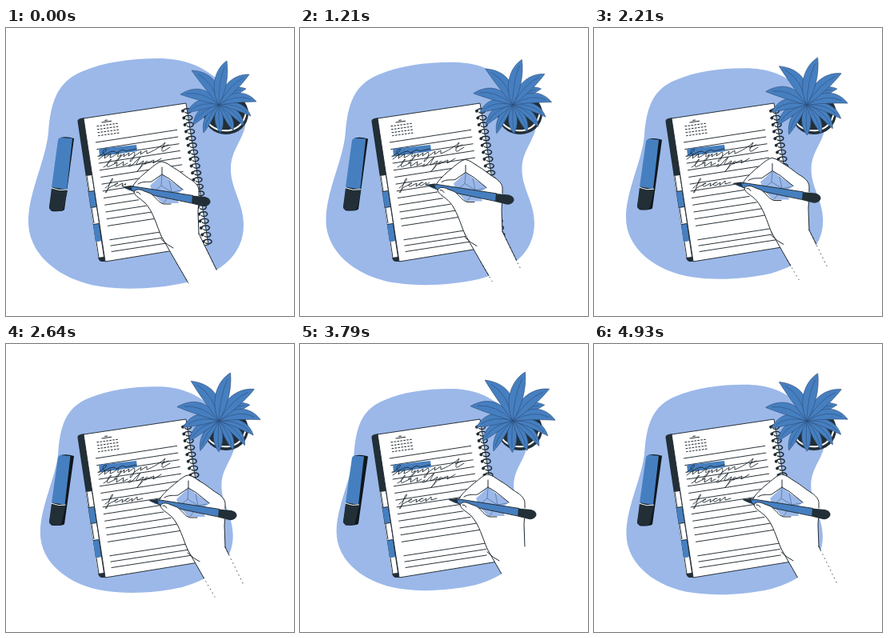
Write an HTML page that moves like this. It is 360x360 px and loops after 5 s.

```html
<!DOCTYPE html>
<html lang="en">
<head>
<meta charset="utf-8">
<title>Writing in a notebook</title>
<style>
html, body { margin: 0; width: 100%; height: 100%; overflow: hidden; background: #fff; }
svg { display: block; width: 100%; height: 100%; }
.ink { fill: none; stroke: #202a30; stroke-width: 1; stroke-linecap: round; stroke-linejoin: round; }
.thin { fill: none; stroke: #202a30; stroke-width: .95; }
.script { stroke-width: .9; }
.ring { stroke-width: 1.4; }
.dash { stroke-dasharray: 2.6 1.4; stroke-linecap: butt; }
.dots { stroke-dasharray: .5 5; }
.dark { fill: #222f37; }
.blue { fill: #467fc0; }
.pale { fill: #9bb8e9; }
.white { fill: #fff; }
.leaf { fill: #467fc0; stroke: #2b4a75; stroke-width: .55; }
.vein { fill: none; stroke: #2b4a75; stroke-width: .5; }
</style>
</head>
<body>
<svg viewBox="0 0 360 360">
  <defs>
    <path id="blobShape" d="M190 38C222 38 243 47 262 62C285 78 302 100 299 122C296 140 282 152 281 174C280 200 297 218 297 246C297 284 268 306 226 318C190 326 150 328 118 323C70 316 28 285 28 242C28 205 50 165 53 130C56 92 64 67 96 54C122 43 155 38 190 38Z"/>
    <clipPath id="blobClip"><use id="blobMask" href="#blobShape"/></clipPath>
    <clipPath id="wordClip"><rect id="wordRect" x="110" y="180" height="35"/></clipPath>
  </defs>

  <use id="blob" class="pale" href="#blobShape"/>

  <g id="marker">
    <path fill="#10171c" d="M68 137Q76 135 85 138L73 227Q71 230 57 229L54 225Z"/>
    <path id="markerFace" class="blue"/>
    <path id="markerCap" class="dark"/>
    <path id="markerLine" fill="none" stroke="#fff"/>
  </g>

  <g id="book">
    <path class="dark" d="M89.5 117Q89 114 93 113L98 112L124 292L119 292Q116 291 115 287Z"/>
    <path class="white" d="M97 113L225 94L253 271L124 292Z"/>
    <path class="white" d="M100 185L107 184L110 203L103 204ZM106 225L113 224L116 244L109 245ZM112 267L119 266L122 286L115 287Z"/>
    <path class="blue" d="M103 205L110 204L113 223L106 224ZM109 246L116 245L119 266L112 267Z"/>
    <path class="thin" d="M97 113L225 94L253 271L124 292ZM101 185L104 204M107 225L110 244M113 267L116 287"/>
    <path id="rules" class="thin"/>
    <g class="ink" transform="rotate(-8 127 126)">
      <path d="M121 117H133M125 115H128"/>
      <path class="dash" d="M114 121H141M114 125H141M114 129H141M114 133H141"/>
    </g>
    <path class="blue" d="M116 151L163 146L164 154L117 160Z"/>
    <g class="ink">
      <path class="script" d="M116 160C122 157 127 152 125 151C121 151 119 158 124 158L130 155L135 154L138 156L146 152L150 154L163 151"/>
      <path class="script" d="M116 164L124 158L123 163L131 157L130 162C136 160 138 157 141 156C138 162 140 162 144 158C145 158 139 168 136 169C134 168 142 162 148 157L147 161L154 156L153 160L160 155C163 156 158 167 155 167C155 163 164 158 169 154L168 158L176 153L176 157C184 154 194 148 199 143C195 151 193 155 197 154L205 149M194 150L203 146"/>
      <path class="script" d="M122 174C128 171 133 163 131 164C127 167 124 176 129 173L139 168L138 173L147 167L146 172L152 169M156 170C152 171 152 175 157 172L168 161C163 169 161 173 166 170L172 166C170 171 166 178 164 179L175 167C179 165 177 170 173 170L185 165L184 169L194 163"/>
      <path class="script" clip-path="url(#wordClip)" d="M124 200C130 196 135 188 133 188C130 190 128 202 125 206C123 206 128 199 134 197L140 194C136 194 134 198 138 198L146 194L145 198L152 193M154 193C149 193 148 198 152 197L158 193L157 197L164 191L164 195L171 193"/>
    </g>
    <g id="rings"></g>
  </g>

  <g id="pot">
    <ellipse class="dark" cx="275" cy="107" rx="28" ry="26"/>
    <path fill="none" stroke="#fff" stroke-width="2" d="M251 116Q260 130 279 128Q296 125 300 106"/>
  </g>
  <g id="plant"></g>

  <g id="hand">
    <path class="white" d="M159 202C160 193 166 188 174 181C184 173 190 167 195 167C201 168 205 172 210 175C219 180 226 187 232 190C239 195 241 199 241 203L240 230L241 257L264 304L228 319L214 295L194 260C188 246 184 230 175 220C170 214 161 211 160 205Z"/>
    <path class="pale" d="M180 197L195 183L204 190L222 202L212 208L216 219L195 219L184 207Z"/>
    <path class="vein" d="M195 184L194 197L182 207M194 197L207 205L197 219M204 190L207 205L219 203"/>
  </g>
  <g id="pen">
    <path class="blue" d="M146 199L156 197.5L234 209.5L233 219L154 203Z"/>
    <path class="dark" d="M145 198.5L156 197L158 203.8Z"/>
    <path class="dark" d="M233 209.5L249 211Q256 213 255.5 218Q253 224 246 223L232 219.5Z"/>
    <path class="thin" d="M156 197.5L234 209.5M157 203.5L232 219"/>
    <path class="white" d="M160 205C162 201 167 201 173 204L181 207C188 212 190 218 195 223L185 232C176 220 161 213 160 207Z"/>
    <path class="ink" d="M158 199C160 194 166 188 174 181C184 173 190 167 195 167C201 168 205 172 210 175C219 180 226 187 232 190C239 195 241 199 241 203V209"/>
    <path class="ink" d="M165 195C171 191 178 193 182 192L195 183V174M195 183L205 189L221 202"/>
    <path class="ink" d="M160 205C162 201 167 201 173 204L181 207C188 212 190 218 197 220L206 220M163 205Q166 204 168 208M160 205C161 211 170 214 175 220C184 230 188 246 194 260"/>
    <path class="ink" d="M240.5 222L240 230L241 257M194 264Q201 271 209 275"/>
  </g>
  <g clip-path="url(#blobClip)">
    <path id="arm" class="ink" d="M194 260L214 295L228 319M241 257L264 304"/>
  </g>
  <g id="dots" class="ink dots">
    <path id="dotsLeft" d="M214 295L228 319"/>
    <path id="dotsRight" d="M241 257L264 304"/>
  </g>
</svg>
<script>
const NS = "http://www.w3.org/2000/svg";
const LOOP = 5000;
const $ = id => document.getElementById(id);

function add(parent, tag, attrs) {
  const el = document.createElementNS(NS, tag);
  for (const k in attrs) el.setAttribute(k, attrs[k]);
  return $(parent).appendChild(el);
}

// Ruled lines and spiral binding
const rows = [...Array(13).keys(), 14, 14.85, 15.7];
$("rules").setAttribute("d", rows.map(k =>
  `M${112 + 1.25 * k} ${143 + 8.7 * k}l102 -15.7`).join(""));

for (let i = 0; i < 20; i++) {
  const y = 103 + 8.6 * i, x = 226 + (y - 103) * .157;
  add("rings", "circle", { cx: x - 5, cy: y + .8, r: 2, class: "dark" });
  add("rings", "path", { class: "ink ring",
    d: `M${x - 5} ${y}C${x - 2} ${y - 3} ${x + 5} ${y - 3} ${x + 5.5} ${y + .5}C${x + 5} ${y + 4} ${x} ${y + 4} ${x - 2} ${y + 2.5}` });
}

// Leaves: tip x, tip y, half width, bend
const core = [266, 96];
const leaves = [
  [268, 131, 7, 1], [284, 128, 6, -3], [247, 131, 6, 4], [297, 122, 6, -6],
  [234, 121, 7, 6], [306, 110, 6, -7], [226, 106, 8, 7], [300, 76, 7, -6],
  [313, 92, 8, -9], [218, 83, 9, 8], [304, 58, 9, -6], [232, 53, 10, 9],
  [276, 41, 10, -4]
];
for (const [tx, ty, w, bend] of leaves) {
  const [cx, cy] = core, dx = tx - cx, dy = ty - cy, len = Math.hypot(dx, dy);
  const at = (u, v) =>
    `${(cx + dx * u - dy / len * v).toFixed(1)} ${(cy + dy * u + dx / len * v).toFixed(1)}`;
  add("plant", "path", { class: "leaf",
    d: `M${at(0, 0)}C${at(.3, w + bend)} ${at(.7, w + bend)} ${at(1, 0)}C${at(.75, bend - w)} ${at(.3, bend - w)} ${at(0, 0)}Z` });
  add("plant", "path", { class: "vein", d: `M${at(0, 0)}Q${at(.5, bend * 1.4)} ${at(.86, bend * .35)}` });
}

// Hand travel: time, dx, dy
const travel = [
  [0, 0, 0], [600, 5.5, -1], [1210, 12, -2.5], [1790, 23, -6],
  [2640, 33, -3], [3210, 38.5, -4], [3450, 40, -4], [LOOP, 40, -4]
];
function handAt(t) {
  const i = travel.findIndex(k => k[0] > t);
  const a = travel[i - 1], b = travel[i], u = (t - a[0]) / (b[0] - a[0]);
  return [a[1] + (b[1] - a[1]) * u, a[2] + (b[2] - a[2]) * u];
}

const about = (x, y, s, r = 0) =>
  `translate(${x} ${y}) rotate(${r}) scale(${s}) translate(${-x} ${-y})`;

function draw(t) {
  const p = (1 - Math.cos(Math.PI * t / 3600)) / 2;

  const swell = about(170, 184, 1 - .125 * p);
  $("blob").setAttribute("transform", swell);
  $("blobMask").setAttribute("transform", swell);
  $("plant").setAttribute("transform", about(...core, 1 + .125 * p, 4 * p));

  const e = 3 * p;
  $("marker").setAttribute("transform", `translate(0 ${10 * p}) scale(1 ${1 - .055 * p})`);
  $("markerFace").setAttribute("d", `M65 140Q66 137 69 137L${83 - e} 138L${76 - e} 202L57 199Z`);
  $("markerCap").setAttribute("d", `M57 200L${77 - e} 203L${72 - e} 226Q${71 - e} 229 ${67 - e} 229L57 228Q54 227 54 224Z`);
  $("markerLine").setAttribute("d", `M57 200Q66 204 ${77 - e} 202`);

  const [dx, dy] = handAt(t), move = `translate(${dx} ${dy})`;
  for (const id of ["hand", "pen", "arm", "dots"]) $(id).setAttribute("transform", move);
  $("wordRect").setAttribute("width", 40 + dx);
  $("dotsLeft").style.opacity = t < 3000 ? 1 : 0;
  $("dotsRight").style.opacity = t < 3000 || t > 4000 ? 1 : 0;
}

function tick() {
  draw(performance.now() % LOOP);
  requestAnimationFrame(tick);
}
tick();
</script>
</body>
</html>
```
